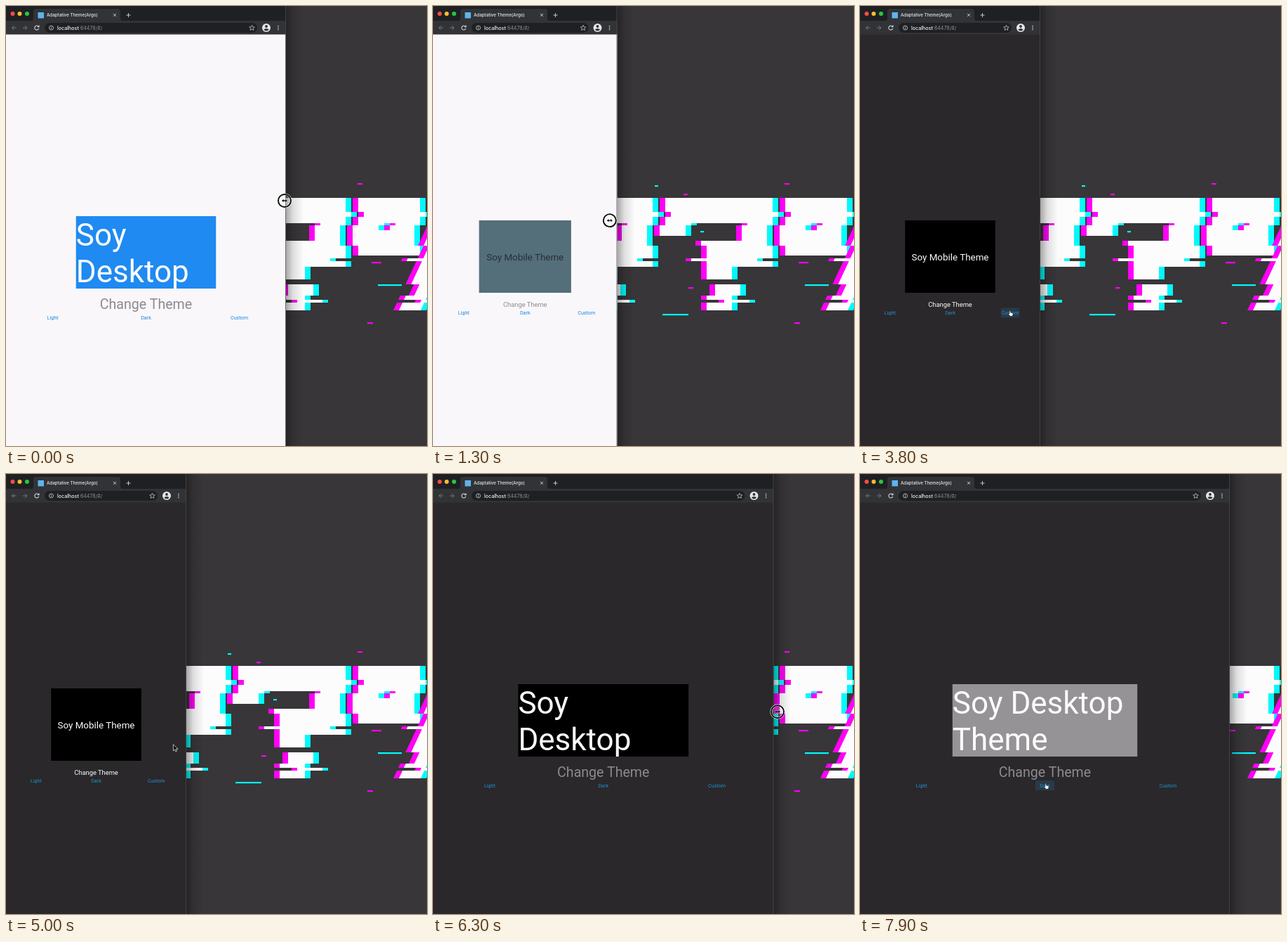
These frames come from a looping animation (600x626 px, 8000 ms). An HTML page:

```html
<!DOCTYPE html>
<html lang="es">
<head>
<meta charset="utf-8">
<title>Adaptative Theme</title>
<style>
html, body { margin: 0; width: 100%; height: 100%; overflow: hidden; background: #383638; }
body > svg { display: block; width: 600px; height: 626px; }
.ui { font-family: Inter, "Open Sans", sans-serif; }
.app { font-family: Roboto, Arial, sans-serif; }
.mid { text-anchor: middle; }
</style>
</head>
<body>
<svg viewBox="0 0 600 626">
  <defs>
    <linearGradient id="fade">
      <stop offset="0" stop-color="#000" stop-opacity=".34"/>
      <stop offset=".4" stop-color="#000" stop-opacity=".12"/>
      <stop offset="1" stop-color="#000" stop-opacity="0"/>
    </linearGradient>
    <path id="question" d="M331 273H484V371H426V389H390V334H448V309H368V327H331zM390 396h36v37h-36z"/>
    <path id="block" fill-rule="evenodd" d="M502 273h88v82h-88zM539 309v10h16v-10z"/>
    <path id="slash" d="M560 433L635 273h31L591 433z"/>
    <g id="lettering"></g>
  </defs>
  <rect width="600" height="626" fill="#383638"/>
  <g id="wallpaper"></g>
  <rect id="shadow" width="25" height="626" fill="url(#fade)"/>

  <g class="app">
    <rect id="page" y="40" height="586"/>
    <rect id="box" height="103"/>
    <g id="desktop" font-size="44" fill="#fcfcfd">
      <text id="line1" y="341"></text>
      <text id="line2" y="393"></text>
    </g>
    <text id="mobile" class="mid" font-size="13.4" y="361.5">Soy Mobile Theme</text>
    <text id="heading" class="mid">Change Theme</text>
    <rect id="hover" width="27" height="14" rx="1.5" fill="#1f8fd0" fill-opacity=".18"/>
    <g id="buttons" class="mid" font-size="7.2">
      <text>Light</text><text>Dark</text><text>Custom</text>
    </g>
  </g>

  <g class="ui">
    <rect id="strip" height="22" fill="#1e2023"/>
    <rect id="toolbar" y="21" height="19.5" fill="#323337"/>
    <path d="M36 21q3 0 3-3V8q0-4 4-4h116q4 0 4 4v10q0 3 3 3z" fill="#323337"/>
    <circle cx="9.5" cy="11" r="3" fill="#ff4b47"/>
    <circle cx="19.5" cy="11" r="3" fill="#fdbc2e"/>
    <circle cx="30" cy="11" r="3" fill="#28c840"/>
    <rect x="45.5" y="9" width="8.5" height="8.5" fill="#5fb4ec"/>
    <text x="58" y="15.2" font-size="6.2" font-weight="500" fill="#e9eaed">Adaptative Theme(Argo)</text>
    <g fill="none" stroke="#d5d7da" stroke-width=".9">
      <path d="M153 10.8l4 4m0-4l-4 4M171.5 13h6m-3-3v6"/>
      <path d="M14.500 31h-6m3-3l-3 3 3 3M24 31h6m-3-3l3 3-3 3" stroke="#7d7f83"/>
      <path d="M46.300 29.300A3 3 0 1 0 46.700 32M47 27.500v2.300h-2.300" stroke-width="1.1"/>
    </g>
    <rect id="pill" x="55" y="24" height="14" rx="7" fill="#1e2023"/>
    <circle cx="64.5" cy="31" r="3" fill="none" stroke="#d5d7da" stroke-width=".8"/>
    <path d="M64.500 29v.8m0 .7v2.200" stroke="#d5d7da" stroke-width=".8"/>
    <text x="73" y="33.5" font-size="7.1" fill="#8f9195"><tspan fill="#f4f5f7" font-weight="500">localhost</tspan>:64478/#/</text>
    <g id="tools" fill="#e6e7ea">
      <path d="M-48.500 27.300l1.100 2.500 2.700.2-2.100 1.800.7 2.600-2.400-1.400-2.400 1.400.7-2.600-2.100-1.800 2.700-.2z" fill="none" stroke="#d5d7da" stroke-width=".7"/>
      <circle cx="-28" cy="31" r="6"/>
      <circle cx="-28" cy="29" r="1.9" fill="#323337"/>
      <path d="M-31.800 33.800q3.800-3.600 7.600 0-3.800 3.400-7.600 0z" fill="#323337"/>
      <path d="M-11 28.500v5.100" stroke="#e6e7ea" stroke-width="1.6" stroke-linecap="round" stroke-dasharray="0 2.500"/>
    </g>
    <path id="edge" d="M-.5 0V626" stroke="#4c4a4d" stroke-width=".8"/>
  </g>

  <g id="cursor">
    <g id="ring">
      <circle r="9" fill="#fff" fill-opacity=".12" stroke="#fff" stroke-opacity=".8" stroke-width="3.2"/>
      <circle r="9" fill="none" stroke="#0a0a0a" stroke-width="1.9"/>
      <path id="arrows" fill="#111" stroke="#fff" stroke-width=".7" paint-order="stroke"/>
    </g>
    <path id="pointer" d="M0 0v9l2.100-2 1.400 3.200 1.500-.7-1.400-3h2.900z" fill="#000" stroke="#fff" stroke-width=".7"/>
    <path id="hand" transform="scale(.85)" d="M-1.500-4q1-1 1.600.2l.5 2.600 3.400.9q1 .5.7 2L4 5H-.2L-3 1.500q0-1.400 1-.8l.9.6z" fill="#fff" stroke="#111" stroke-width=".7"/>
  </g>
</svg>
<script>
const LOOP = 8000, STEP = 100;
const MIN_WIDTH = 257, BREAKPOINT = 308;
const DRAG_OUT = 5400, DRAG_TIME = 1480;
const PINK = '#ff00f6', CYAN = '#00fafc', WHITE = '#fdfcfd';

const el = id => document.getElementById(id);
const set = (node, attrs) => {
  if (typeof node === 'string') node = el(node);
  for (const key in attrs) node.setAttribute(key, attrs[key]);
};
const show = (id, on) => set(id, { display: on ? 'inline' : 'none' });

// Each glyph gets a pink copy to the left and a cyan copy to the right
const split = (id, dx = 0) => [[PINK, -8], [CYAN, 8], [WHITE, 0]].map(([fill, off]) =>
  `<use href="#${id}" x="${dx + off}" fill="${fill}"/>`).join('');

// Horizontal slices of the lettering: [top, shift]
const SLICES = [
  [273, 0], [293, 8], [300, 0], [312, -8], [341, 0], [359, -22],
  [363, 0], [396, 12], [412, 0], [418, 25], [422, 0]
];
const slice = ([top, shift], i) => {
  const height = (SLICES[i + 1] || [433])[0] - top;
  return `<svg y="${top}" width="600" height="${height}" viewBox="${-shift} ${top} 600 ${height}">
    <use href="#lettering"/></svg>`;
};

// Loose flecks, alternately pink and cyan: [x, y, width]
const FLECKS = [
  [501, 252, 7], [316, 255, 5], [357, 267, 6], [381, 320, 5], [521, 364, 14],
  [530, 396, 34], [515, 450, 8], [327, 438, 37], [364, 400, 7]
];
const fleck = ([x, y, w], i) =>
  `<rect x="${x}" y="${y}" width="${w}" height="2.2" fill="${i % 2 ? CYAN : PINK}"/>`;

el('lettering').innerHTML = split('question', -171) + split('question') + split('block') + split('slash');
el('wallpaper').innerHTML = SLICES.map(slice).join('') + FLECKS.map(fleck).join('');

const clamp = v => Math.min(1, Math.max(0, v));
const lerp = (a, b, p) => a + (b - a) * p;
const mix = (a, b, p) => `rgb(${a.map((v, i) => Math.round(lerp(v, b[i], p)))})`;
const fadeAt = (t, start) => clamp((t - start) / 200);

function windowWidth(t) {
  if (t < DRAG_OUT) return Math.max(MIN_WIDTH, 399 - 0.105 * t);
  const p = clamp((t - DRAG_OUT) / DRAG_TIME);
  return lerp(MIN_WIDTH, 527, 1 - (1 - p) ** 2);
}

// Key points of the pointer: [time, x, y]
const PATH = [
  [0, 397, 277], [1800, 196, 316], [2400, 211, 311], [3500, 214, 437],
  [4500, 214, 437], [DRAG_OUT, 258, 343], [6900, 527, 335], [7500, 265, 444], [LOOP, 265, 444]
];
function pointerAt(t) {
  const i = PATH.findIndex(key => key[0] > t);
  const [t0, x0, y0] = PATH[i - 1], [t1, x1, y1] = PATH[i];
  const p = (t - t0) / (t1 - t0);
  const pulling = t0 === DRAG_OUT;
  return [pulling ? windowWidth(t + 40) : lerp(x0, x1, p), lerp(y0, y1, p)];
}

const BOTH = 'M-4 0l2.600-2.200v1.500h2.800v-1.500L4 0 1.400 2.200V.7h-2.800v1.500z';
const RIGHT = 'M-2 -.7h3v-1.600L4 0 1 2.300V.7h-3z';
const BLACK = [0, 0, 0], GREY = [149, 147, 149], SNOW = [252, 252, 253];

function draw(t) {
  const w = windowWidth(t), [mx, my] = pointerAt(t);
  const dark = fadeAt(t, 3600), grey = fadeAt(t, 7600);
  const mobile = w < BREAKPOINT;

  set('shadow', { x: w });
  for (const id of ['strip', 'toolbar', 'page']) set(id, { width: w });
  set('pill', { width: w - 96 });
  for (const id of ['tools', 'edge']) set(id, { transform: `translate(${w})` });
  set('page', { fill: mix([249, 247, 250], [42, 40, 42], dark) });

  const lit = mobile ? [84, 110, 122] : [31, 138, 241];
  set('box', {
    x: w / 4, y: mobile ? 305 : 299, width: w / 2,
    fill: grey ? mix(BLACK, GREY, grey) : mix(lit, BLACK, dark)
  });

  const fits = w / 2 > 244.2;
  el('line1').textContent = fits ? 'Soy Desktop' : 'Soy';
  el('line2').textContent = fits ? 'Theme' : 'Desktop';
  for (const id of ['line1', 'line2']) set(id, { x: w / 4 });
  show('desktop', !mobile);
  show('mobile', mobile);
  set('mobile', { x: w / 2, fill: mix([38, 48, 54], SNOW, dark) });
  set('heading', {
    x: w / 2, y: mobile ? 427.5 : 430.5, 'font-size': mobile ? 9.35 : 19.6,
    fill: mix([140, 138, 142], mobile ? SNOW : [140, 138, 140], dark)
  });

  const baseline = mobile ? 439 : 445.5;
  [...el('buttons').children].forEach((node, i) => set(node, {
    x: w * (2 * i + 1) / 6, y: baseline, fill: mix([28, 136, 228], [31, 143, 208], dark)
  }));

  const onButton = my > 430;
  const pressed = t < 2700 || (t >= DRAG_OUT && t < 6900);
  show('hover', onButton);
  set('hover', { x: w * (mobile ? 5 / 6 : 1 / 2) - 13.5, y: baseline - 9.5 });
  set('cursor', { transform: `translate(${mx} ${my})` });
  show('ring', pressed);
  show('hand', !pressed && onButton);
  show('pointer', !pressed && !onButton);
  set('arrows', { d: w <= MIN_WIDTH ? RIGHT : BOTH });
}

const start = performance.now();
function frame(now) {
  const t = Math.max(0, now - start) % LOOP;
  draw(Math.floor(t / STEP) * STEP);
  requestAnimationFrame(frame);
}
draw(0);
requestAnimationFrame(frame);
</script>
</body>
</html>
```
